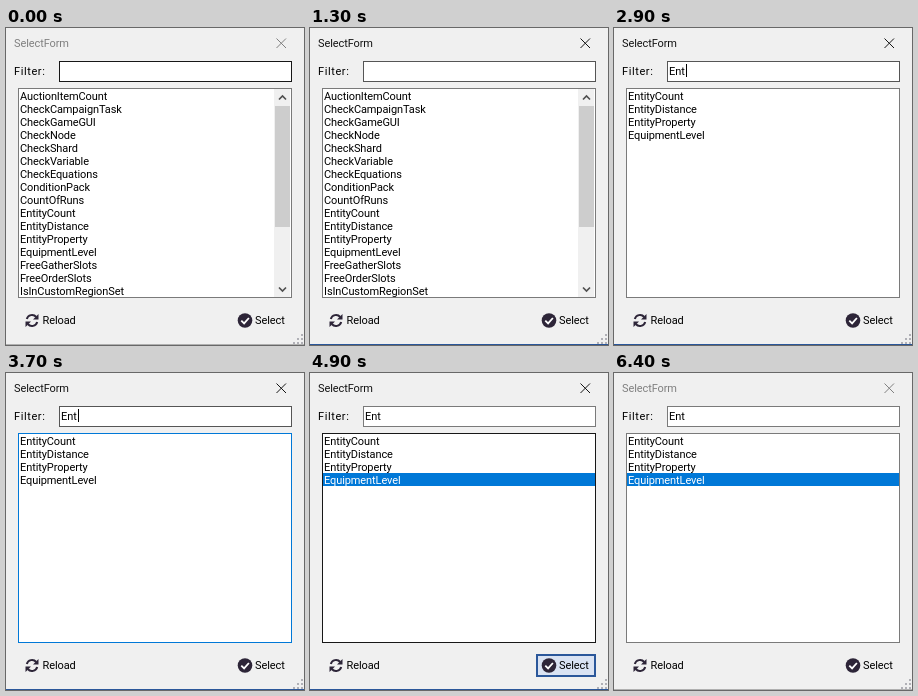
Animation, 298 px wide and 317 px high, one loop 6.5 s. Source, as an HTML page:

```html
<!DOCTYPE html>
<html lang="en">
<head>
<meta charset="utf-8">
<title>SelectForm</title>
<style>
  html, body { margin: 0; width: 100%; height: 100%; overflow: hidden; background: #f0f0f0; }
  svg { display: block; width: 298px; height: 317px; }
  text { font: 11px Roboto, "Open Sans", sans-serif; letter-spacing: -.1px; white-space: pre; }
  .crisp { shape-rendering: crispEdges; }
</style>
</head>
<body>
<svg viewBox="0 0 298 317">
  <rect width="298" height="317" fill="#f0f0f0"/>
  <text id="title" x="8" y="19">SelectForm</text>
  <path id="close" d="M270.5 10.5l9.5 9.5M280 10.5l-9.5 9.5" fill="none"/>
  <text x="8" y="47" style="letter-spacing:.6px">Filter:</text>
  <rect id="field" class="crisp" x="53.5" y="33.5" width="232" height="20" fill="#fff"/>
  <text id="query" x="55" y="47"></text>
  <rect id="caret" class="crisp" y="36" width="1" height="13"/>

  <rect id="list" class="crisp" x="12.5" y="60.5" width="273" height="209" fill="#fff"/>
  <rect id="mark" class="crisp" x="13" y="100" width="272" height="13" fill="#0078d7"/>
  <g id="rows"></g>
  <g id="scroll">
    <rect x="268" y="61" width="16" height="208" fill="#f0f0f0"/>
    <rect id="thumb" x="269" y="78" width="15" fill="#cdcdcd"/>
    <path d="M273 71.5l3.5-3.5 3.5 3.5M273 259.5l3.5 3.5 3.5-3.5" fill="none" stroke="#505050" stroke-width="1.7"/>
  </g>

  <g fill="none" stroke="#2d2538" stroke-width="2">
    <path d="M20.8 291a5.4 5.4 0 0 1 9.4-2M31.2 294a5.4 5.4 0 0 1-9.4 2"/>
    <path d="M32.5 286v5.5h-5.5zM19.5 299v-5.5h5.5z" fill="#2d2538" stroke="none"/>
  </g>
  <text x="36.5" y="296">Reload</text>

  <rect id="button" class="crisp" x="227" y="282" width="58" height="21" stroke-width="2"/>
  <circle cx="239" cy="292.5" r="7.3" fill="#2d2538"/>
  <path d="M235.3 292.6l2.8 2.8 4.8-5.4" fill="none" stroke="#fff" stroke-width="1.8"/>
  <text x="249" y="296">Select</text>

  <g id="grip" class="crisp"></g>
  <rect id="edge" class="crisp" y="316" width="298" height="1"/>
</svg>
<script>
const LOOP = 6500;
const VISIBLE = 16;
const NS = 'http://www.w3.org/2000/svg';
const $ = id => document.getElementById(id);

const items = `AuctionItemCount CheckCampaignTask CheckGameGUI CheckNode CheckShard
  CheckVariable CheckEquations ConditionPack CountOfRuns EntityCount EntityDistance
  EntityProperty EquipmentLevel FreeGatherSlots FreeOrderSlots IsInCustomRegionSet
  ItemLevel MapName NodeDistance PartySize QuestState TeamSize ZoneTimer`.split(/\s+/);

// Each track is a list of [start time, value]; values hold until the next step.
const tracks = {
  query: [[0, ''], [1600, 'E'], [1800, 'En'], [2000, 'Ent']],
  caret: [[0, 0], [800, 1], [1300, 0], [1600, 1], [2400, 0], [2900, 1], [3800, 0]],
  active: [[0, 0], [600, .4], [700, .75], [800, 1], [6400, 0]],
  field: [[0, '#171717'], [100, '#252525'], [200, '#353535'], [300, '#454545'], [400, '#555'],
    [4100, '#626262'], [4200, '#6e6e6e'], [4300, '#7a7a7a']],
  list: [[0, '#7a7a7a'], [3700, '#0078d7'], [4800, '#0c4877'], [4900, '#171717'], [6400, '#7a7a7a']],
  mark: [[0, 0], [4200, 1]],
  button: [[0, 0], [4800, .5], [4900, 1], [5800, 0]]
};
const caretX = [56, 62, 67, 72];

const at = (track, t) => track.reduce((value, step) => t >= step[0] ? step[1] : value, track[0][1]);
const mix = (a, b, k) => `rgb(${a.map((v, i) => Math.round(v + (b[i] - v) * k))})`;
const set = (id, attrs) => {
  for (const name in attrs) $(id).setAttribute(name, attrs[name]);
};
const add = (parent, tag, attrs) => {
  const node = document.createElementNS(NS, tag);
  for (const name in attrs) node.setAttribute(name, attrs[name]);
  return $(parent).appendChild(node);
};

const rows = Array.from({ length: VISIBLE }, (_, i) => add('rows', 'text', { x: 14, y: 72 + 13 * i }));
for (let r = 0; r < 3; r++)
  for (let c = 0; c <= r; c++)
    add('grip', 'rect', { x: 295 - 4 * c, y: 306 + 4 * r, width: 2, height: 2, fill: '#b0b0b6' });

function draw(t) {
  const now = {};
  for (const name in tracks) now[name] = at(tracks[name], t);

  const ink = mix([128, 128, 128], [20, 20, 20], now.active);
  set('title', { fill: ink });
  set('close', { stroke: ink });
  set('edge', { fill: mix([176, 176, 176], [43, 87, 154], now.active) });
  set('field', { stroke: now.field });
  set('list', { stroke: now.list });
  set('caret', { x: caretX[now.query.length], opacity: now.caret });
  set('mark', { opacity: now.mark });
  set('button', {
    fill: mix([240, 240, 240], [218, 227, 243], now.button),
    stroke: mix([240, 240, 240], [43, 87, 154], now.button)
  });
  $('query').textContent = now.query;

  const found = items.filter(item => item.toLowerCase().includes(now.query.toLowerCase()));
  rows.forEach((row, i) => {
    row.textContent = found[i] || '';
    row.setAttribute('fill', now.mark && i === 3 ? '#fff' : '#000');
  });
  set('scroll', { visibility: found.length > VISIBLE ? 'visible' : 'hidden' });
  set('thumb', { height: Math.round(174 * Math.min(1, VISIBLE / found.length)) });
}

const start = performance.now();
function tick() {
  draw((performance.now() - start) % LOOP);
  requestAnimationFrame(tick);
}
tick();
</script>
</body>
</html>
```
